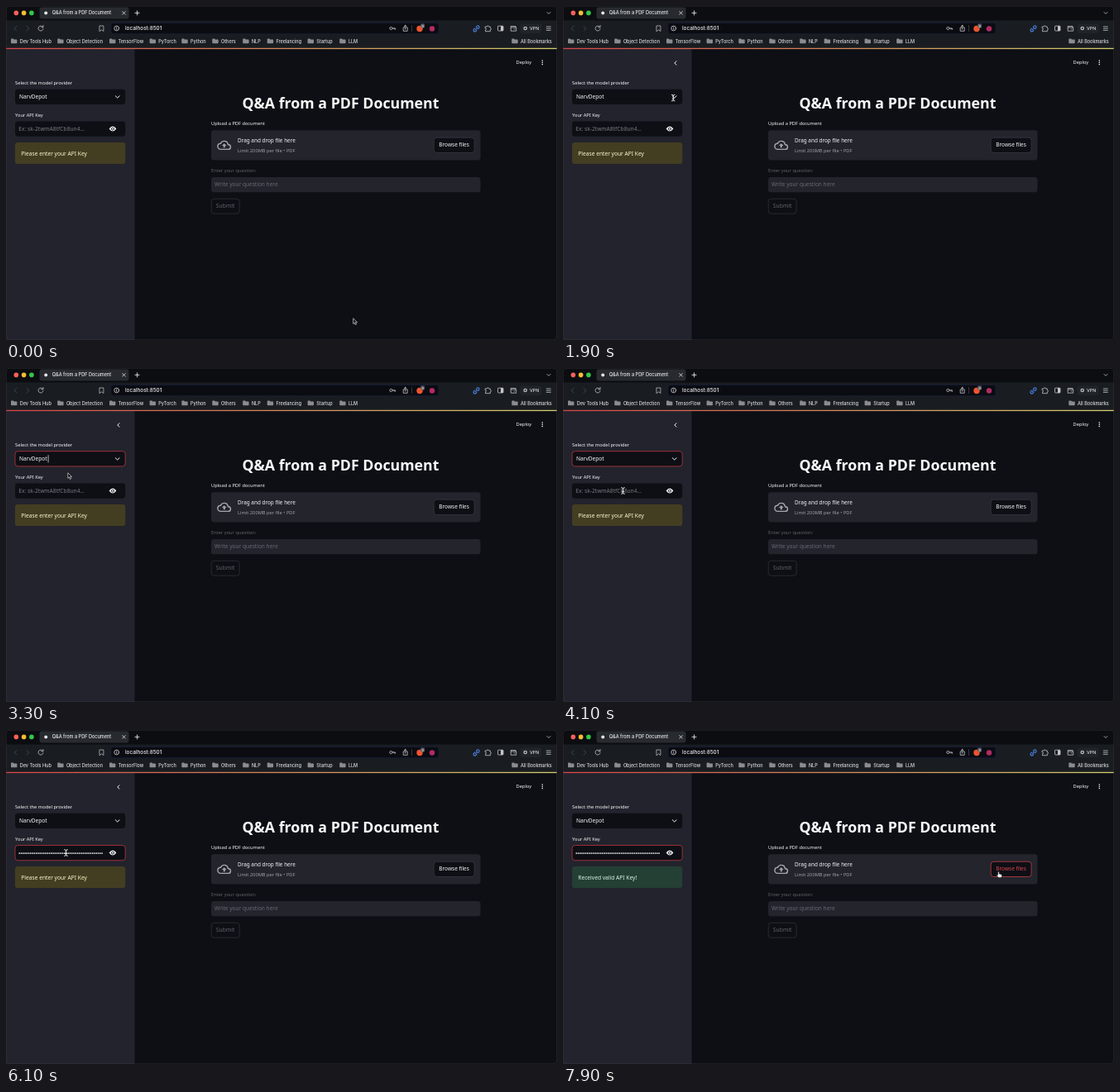
These frames come from a looping animation (666 px wide and 404 px high, 8 s). An HTML page:

```html
<!DOCTYPE html>
<html lang="en">
<head>
<meta charset="utf-8">
<title>Q&amp;A from a PDF Document</title>
<style>
html, body { margin: 0; width: 100%; height: 100%; overflow: hidden; background: #000; }
svg { display: block; width: 100%; height: 100%; }
text { font-family: "Noto Sans", "Open Sans", sans-serif; white-space: pre; }
.ui { font-family: Inter, "Liberation Sans", sans-serif; font-weight: 500; }
.mid { font-weight: 500; }
.line { fill: none; stroke-linecap: round; stroke-linejoin: round; }
</style>
</head>
<body>
<svg id="stage" viewBox="0 0 666 404" xmlns="http://www.w3.org/2000/svg"></svg>
<script>
const LOOP = 8000;
const PROVIDERS = ["NarvDepot", "Monvel"];
const WHITE = "#f7f7f9", RED = "#dc444b", RING = "#bd373f";
const PAGE = "#0d0f15", PANEL = "#23242c", BAR = "#191d21", ICON = "#c4c4ca";

const text = (x, y, str, size, fill = WHITE, extra = "") =>
  `<text x="${x}" y="${y}" font-size="${size}" fill="${fill}" ${extra}>${str.replace(/&/g, "&amp;")}</text>`;
const label = (x, y, str, size, extra = "") => text(x, y, str, size, WHITE, 'class="mid" ' + extra);
const ui = (x, y, str, size = 5.5, fill = "#dcdce0") => text(x, y, str, size, fill, 'class="ui"');
const rect = (x, y, w, h, fill, r = 0, extra = "") =>
  `<rect x="${x}" y="${y}" width="${w}" height="${h}" rx="${r}" fill="${fill}" ${extra}/>`;
const dot = (x, y, r, fill) => `<circle cx="${x}" cy="${y}" r="${r}" fill="${fill}"/>`;
const line = (d, stroke = ICON, w = 0.8, extra = "") =>
  `<path class="line" d="${d}" stroke="${stroke}" stroke-width="${w}" ${extra}/>`;
const group = (id, body) => `<g id="${id}">${body}</g>`;

const folder = x =>
  `<path d="M${x} 40.2q0-.8.8-.8h2l.9 1h2.9q.8 0 .8.8v3.3q0 .8-.8.8h-5.8q-.8 0-.8-.8z" fill="#8b8b92"/>`;
const bookmark = ([x, name]) => folder(x) + ui(x + 10.7, 44.6, name);

function tabStrip() {
  const lights = ["#f9605a", "#f8bc34", "#33c748"].map((c, i) => dot(12.3 + i * 9.3, 8.4, 2.8, c));
  return rect(0, 0, 666, 18, "#0b0d10") + lights.join("") +
    rect(40.5, 1.5, 108, 14, "#272b2f", 3) +
    dot(48.2, 8.4, 2, "#e3e3e6") +
    ui(55.8, 10.3, "Q&A from a PDF Document", 5.55, "#ececf0") +
    line("M140.8 6.7l3.4 3.4m0-3.4l-3.4 3.4", "#dedee2", 0.9) +
    line("M156 8.4h5m-2.5-2.5v5", "#dedee2", 0.9) +
    line("M654 7.5l2 2 2-2");
}

function toolbar() {
  const marks = [[6, "Dev Tools Hub"], [62.2, "Object Detection"], [125, "TensorFlow"], [173.6, "PyTorch"],
    [212.3, "Python"], [249.3, "Others"], [286.2, "NLP"], [315.7, "Freelancing"], [364.6, "Startup"],
    [403.2, "LLM"], [611.3, "All Bookmarks"]];
  return rect(0, 17.5, 666, 33.5, BAR) +
    line("M13 24.5l-3 2.7 3 2.7", "#4b4a52") +
    line("M25 24.5l3 2.7-3 2.7", "#4b4a52") +
    line("M44.5 25.3a3 3 0 1 0 .5 2.4M45 23.5v2.3h-2.3") +
    line("M113.3 24h4.6v6.5l-2.3-1.7-2.3 1.7z", "#b4b4ba") +
    rect(126.9, 20.4, 396.2, 13.4, "#0b0c11", 3, 'stroke="#1b1f40" stroke-width=".8"') +
    line("M136.6 27a2.9 2.9 0 1 1-5.8 0 2.9 2.9 0 1 1 5.8 0M133.7 26.7v1.7M133.7 25.3v.1", "#d4d4d8") +
    ui(144, 29.2, "localhost:8501", 6.4, "#ececf0") +
    line("M467 27a1.6 1.6 0 1 1-3.2 0 1.6 1.6 0 1 1 3.2 0h3.6v1.3m-1.5-1.3v1") +
    line("M481.7 26h-1.5v4.3h5v-4.3h-1.5M482.7 28.3v-5m-1.5 1.5l1.5-1.5 1.5 1.5") +
    line("M490.5 23.5v7", "#55545c", 0.6) +
    dot(500, 27.5, 3.7, "#ef5430") +
    rect(501.2, 21.5, 4.8, 5, "#5b5c66", 1.2) + ui(502.3, 25.7, "3", 4, "#fff") +
    dot(515, 27.5, 3.2, "#b32b63") +
    line("M567.5 28.5l2.2-2.2M568.3 25.3l1-1a1.6 1.6 0 0 1 2.3 2.3l-1 1M568.8 29.5l-1 1a1.6 1.6 0 0 1-2.3-2.3l1-1", "#4f83ea", 1.1) +
    line("M579.5 25h1.8a1.1 1.1 0 1 1 2.2 0h1.8v1.8a1.1 1.1 0 1 1 0 2.2v1.7h-5.8v-1.9a1 1 0 1 0 0-2z") +
    rect(594.5, 24.2, 6.5, 5.8, "none", 0.8, `stroke="${ICON}" stroke-width=".8"`) + rect(598, 24.2, 3, 5.8, ICON) +
    line("M610.5 24.5h5.5v1.5h.7v4.2h-6.5v-5.2zM614.3 28h.5M610.5 26h5.5") +
    rect(621.5, 21.5, 26, 11.5, "#20252a", 3) + dot(627.7, 27, 2.3, "#b8b8bf") + dot(627.7, 27, 0.9, BAR) +
    ui(633, 29, "VPN", 5.3) +
    line("M653.3 25h5m-5 2.2h5m-5 2.2h5") +
    marks.map(bookmark).join("");
}

const eye = `<path d="M124.6 148.6q4.4-6 8.8 0q-4.4 6-8.8 0z" fill="${WHITE}"/>` +
  dot(129, 148.6, 1.9, PAGE) + dot(129, 148.6, 1.1, WHITE);

function sidebar() {
  const field = y => rect(11, y, 133.2, 18.2, PAGE, 3.4);
  const ring = (id, y) => rect(11, y, 133.2, 18.2, "none", 3.4, `id="${id}" stroke="${RING}" stroke-width=".8"`);
  const alert = (id, fill, color, msg) =>
    group(id, rect(10.9, 165, 133.4, 26.1, fill, 3.4) + text(18.3, 180.7, msg, 6.65, color, 'class="mid"'));
  const menu = rect(11, 119.5, 133.2, 38.5, PAGE, 3.4) +
    rect(11, 119.5, 133.2, 18.2, "#23242d") +
    PROVIDERS.map((p, i) => label(18.3, 130.9 + i * 18.6, p, 6.6)).join("");
  return rect(0, 52, 155.5, 352, "#22232c") +
    group("chevron", line("M137 66.8l-2.2 2.2 2.2 2.2", WHITE, 1)) +
    label(11, 95.2, "Select the model provider", 5.75) +
    field(100.7) +
    label(16, 112.2, PROVIDERS[0], 6.6) +
    line("M132.3 108.8l2.4 2.3 2.4-2.3", WHITE, 1) +
    label(11, 134.2, "Your API Key", 5.7) +
    field(139.5) +
    group("hint", text(15.3, 151, "Ex: sk-2twmA8tfCb8un4...", 6.67, "#777982")) +
    group("secret", line("M16.2 149.1H117", WHITE, 1.7, 'stroke-dasharray="0 2.27"')) +
    eye +
    group("apply", text(95.5, 155.4, "Press Enter to apply", 5, "#8c8e96")) +
    alert("warn", "#433e22", "#fbf9cd", "Please enter your API Key") +
    alert("valid", "#243f34", "#dcf8e6", "Received valid API Key!") +
    group("menu", menu) +
    ring("selectRing", 100.7) + ring("keyRing", 139.5) +
    rect(50.7, 105.2, 0.7, 9.2, WHITE, 0, 'id="selectCaret"') +
    rect(15.3, 144.2, 0.7, 9.4, WHITE, 0, 'id="keyCaret"');
}

function page() {
  const cloud = "M19.35 10.04A7.49 7.49 0 0 0 12 4C9.11 4 6.6 5.64 5.35 8.04A6 6 0 0 0 0 14c0 3.31 2.69 6 6 6h13a5 5 0 0 0 .35-9.96z" +
    "M19 18H6a4 4 0 0 1-.44-7.97l1.07-.11.5-.95A5.47 5.47 0 0 1 17.39 10.43l.3 1.5 1.53.11A3 3 0 0 1 19 18zM8 13h2.55v3h2.9v-3H16l-4-4z";
  return label(616.5, 70.2, "Deploy", 5.75) +
    [66, 68.3, 70.6].map(y => dot(648.3, y, 0.8, WHITE)).join("") +
    text(285.4, 124.1, "Q&A from a PDF Document", 17.75, "#fafafa", 'font-weight="700"') +
    label(248, 144.3, "Upload a PDF document", 5.7) +
    rect(248, 150.2, 325.5, 36.3, PANEL, 3.4) +
    `<path transform="translate(255.2 159.8) scale(.715)" fill-rule="evenodd" fill="#a4a6ae" d="${cloud}"/>` +
    label(280, 165.2, "Drag and drop file here", 6.4) +
    text(280, 176.9, "Limit 200MB per file • PDF", 5.72, "#a0a1a8") +
    rect(517.2, 159.2, 48.9, 18.3, PAGE, 3.4, 'id="browseBox" stroke-width=".7"') +
    label(541.6, 170.4, "Browse files", 6.5, 'id="browseText" text-anchor="middle"') +
    text(248, 201.3, "Enter your question:", 5.7, "#60626a") +
    rect(248, 207, 325.5, 18.3, PANEL, 3.4) +
    text(252, 218.3, "Write your question here", 6.55, "#686a73") +
    rect(248.2, 233.2, 34, 18, PAGE, 3.4, 'stroke="#33353d" stroke-width=".7"') +
    text(265.2, 244.3, "Submit", 6.8, "#60626a", 'text-anchor="middle"');
}

const pointers =
  group("arrow", `<path d="M0 0v6.6l1.5-1.3 1.1 2.4 1.2-.5-1.1-2.4h2.1z" fill="#111" stroke="#e8e8ea" stroke-width=".65" stroke-linejoin="round"/>`) +
  group("beam", line("M-1.8-3.8q1.8 0 1.8 1.1v5.4q0 1.1-1.8 1.1M1.8-3.8q-1.8 0-1.8 1.1M1.8 3.8q-1.8 0-1.8-1.1M-1 .9h2", "#fff", 0.9)) +
  group("hand", `<path d="M-.8-2.8q.8-.9 1.5 0v2.3l2.7.7q.8.3.6 1.3l-.6 2.5h-3.6l-2.2-2.7q-.1-1 1.6-.2z" fill="#fff" stroke="#111" stroke-width=".5" stroke-linejoin="round"/>`);

document.getElementById("stage").innerHTML =
  `<defs><linearGradient id="bar"><stop stop-color="#d9464a"/><stop offset="1" stop-color="#d3cc6c"/></linearGradient></defs>` +
  rect(0, 0, 666, 404, PAGE) + tabStrip() + toolbar() + page() + sidebar() +
  rect(0, 50.8, 666, 1.3, "url(#bar)") +
  rect(0.25, 0.25, 665.5, 403.5, "none", 4, 'stroke="#3a3b43" stroke-width=".5"') +
  pointers;

const el = id => document.getElementById(id);
const show = (id, amount) => el(id).setAttribute("opacity", +amount);
const within = (t, a, b) => t >= a && t < b;
const ramp = (t, a, b) => Math.min(1, Math.max(0, (t - a) / (b - a)));
const blink = (t, start) => Math.floor((t - start) / 500) % 2 === 0;

// time, x, y
const PATH = [
  [0, 419.7, 377.8], [80, 419.7, 377.8], [400, 457, 250], [580, 457, 250], [1000, 112, 152], [1100, 98, 145],
  [1400, 120, 124], [1500, 122, 121], [2000, 134.5, 110], [2430, 134.5, 110], [2800, 74.8, 126.8],
  [3300, 74.8, 126.8], [4100, 72.5, 148.5], [6700, 72.5, 148.5], [6800, 75.5, 146.5],
  [7300, 356, 184], [7450, 356, 184], [7850, 526.5, 174.5], [8000, 526.5, 174.5]];

function position(t) {
  const i = Math.max(1, PATH.findIndex(p => p[0] > t));
  const [a, b] = [PATH[i - 1], PATH[i]];
  const u = ramp(t, a[0], b[0]), k = u * u * (3 - 2 * u);
  return [a[1] + (b[1] - a[1]) * k, a[2] + (b[2] - a[2]) * k];
}

function pointerKind(t) {
  if (within(t, 1000, 1300) || within(t, 1800, 2550) || within(t, 3700, 6850)) return "beam";
  if (within(t, 2550, 3080) || t >= 7750) return "hand";
  return "arrow";
}

function draw(t) {
  const [x, y] = position(t), kind = pointerKind(t);
  for (const id of ["arrow", "beam", "hand"]) {
    el(id).setAttribute("transform", `translate(${x} ${y})`);
    show(id, id === kind);
  }
  if (within(t, 6780, 6850)) show("arrow", 0.5);

  show("chevron", within(t, 950, 6950));
  show("menu", 0.93 * ramp(t, 2150, 2350) * (1 - ramp(t, 2900, 3060)));
  show("selectRing", ramp(t, 2150, 2300) * (1 - ramp(t, 4230, 4400)));
  show("selectCaret", within(t, 2200, 4280) && blink(t, 2200));

  const pasted = t >= 5300;
  show("hint", !pasted);
  show("secret", pasted);
  show("apply", within(t, 5300, 6000));
  show("keyRing", ramp(t, 4230, 4400));
  show("keyCaret", t >= 4300 && blink(t, 4300));
  el("keyCaret").setAttribute("x", pasted ? 116.6 : 15.3);
  show("warn", t < 6200);
  show("valid", t >= 6200);

  const hover = t >= 7750;
  el("browseBox").setAttribute("stroke", hover ? RED : "#3b3d46");
  el("browseText").setAttribute("fill", hover ? RED : WHITE);
}

const start = performance.now();
function tick() {
  draw((performance.now() - start) % LOOP);
  requestAnimationFrame(tick);
}
draw(0);
requestAnimationFrame(tick);
</script>
</body>
</html>
```
